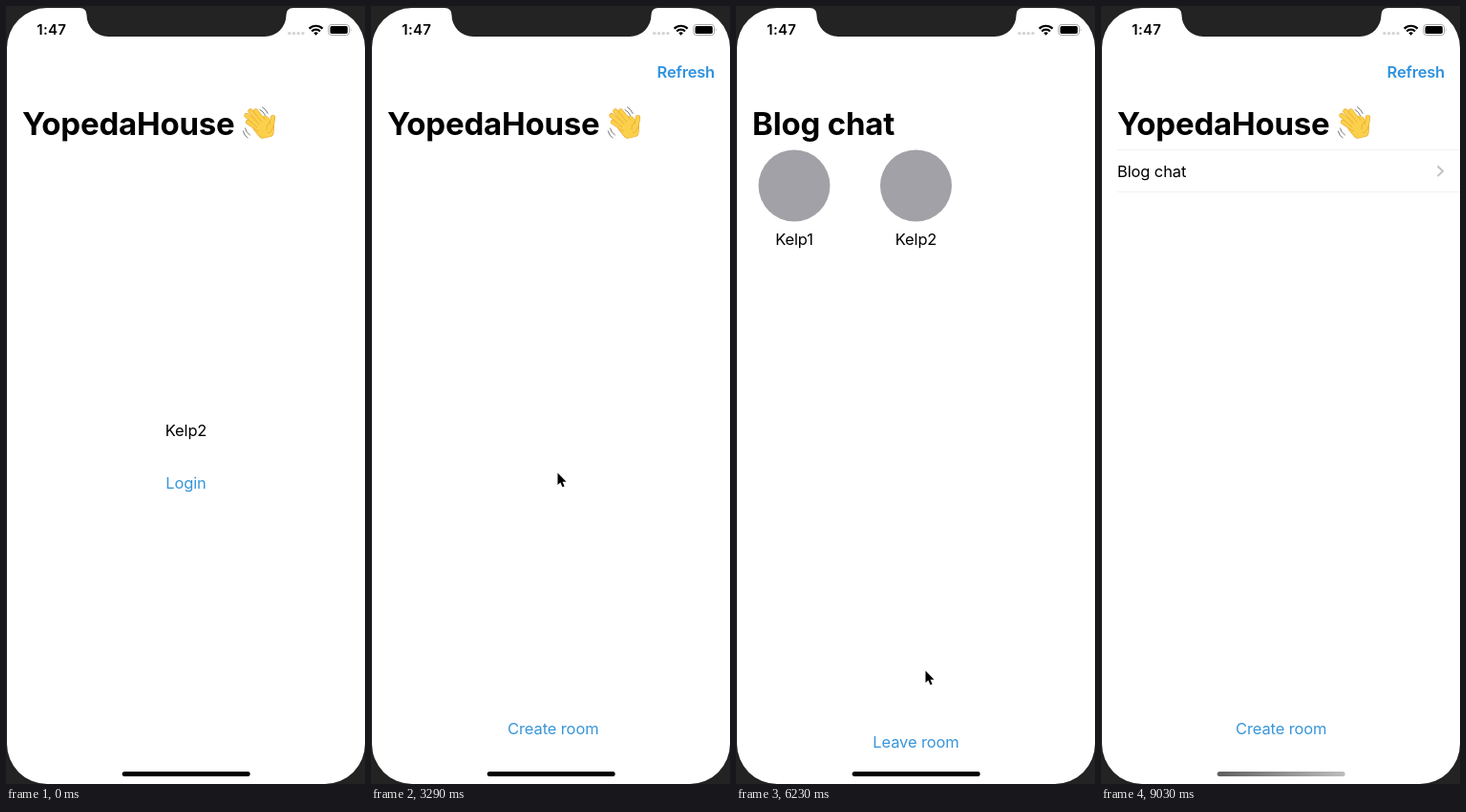
Write an HTML page that moves like this. It is 376 px wide and 814 px high and loops after 9100 ms.

```html
<!DOCTYPE html>
<html lang="en">
<head>
<meta charset="utf-8">
<title>Audio rooms demo</title>
<style>
  html, body { margin: 0; width: 100%; height: 100%; overflow: hidden; background: #232323; }
  svg { display: block; width: 100vw; height: 100vh; }
  text { font: 16.5px Inter, "Open Sans", sans-serif; letter-spacing: -.12px; }
  .mid { text-anchor: middle; }
  .link { fill: #3896d9; }
  .title { font-size: 33px; font-weight: 700; letter-spacing: -.2px; }
  .nav { font-size: 16.5px; font-weight: 600; letter-spacing: -.2px; text-anchor: end; fill: #2e92de; }
  .clock { font-size: 15px; font-weight: 600; letter-spacing: .3px; }
</style>
</head>
<body>
<svg viewBox="0 0 376 814" preserveAspectRatio="none">
  <defs>
    <g id="loader">
      <g class="spinner" transform="translate(188.5 435)" stroke="#8c8c90" stroke-width="2.5" stroke-linecap="round"></g>
      <text class="mid" x="188.5" y="481">Loading</text>
    </g>
    <linearGradient id="barFill"><stop id="barLeft" offset="0"/><stop id="barRight" offset="1"/></linearGradient>
  </defs>
  <rect width="376" height="814" fill="#fff"/>

  <g id="login">
    <g id="form">
      <text class="mid" x="188.5" y="450">Kelp2</text>
      <text class="mid link" id="loginBtn" x="188.5" y="505">Login</text>
    </g>
    <use id="loginWait" href="#loader"/>
  </g>

  <g id="rooms">
    <rect width="376" height="814" fill="#fff"/>
    <g id="list">
      <path d="M17 150.5H376M17 194.5H376" stroke="#f2f2f3"/>
      <rect id="cell" y="150.5" width="376" height="43.5" fill="#dddde2"/>
      <text x="17" y="178.5">Blog chat</text>
      <path d="M352.5 167.5l5.5 5.3l-5.5 5.3" fill="none" stroke="#c2c2c6" stroke-width="2"/>
    </g>
    <text class="mid link" x="188.7" y="762">Create room</text>
  </g>

  <g id="room">
    <rect width="376" height="814" fill="#fff"/>
    <text class="title" x="17" y="134.5">Blog chat</text>
    <use id="roomWait" href="#loader"/>
    <g id="people">
      <g fill="#a2a1a7"><circle cx="61" cy="188" r="37.5"/><circle cx="188.5" cy="188" r="37.5"/></g>
      <text class="mid" x="61" y="249.5">Kelp1</text>
      <text class="mid" x="188.5" y="249.5">Kelp2</text>
      <text class="mid link" id="leaveBtn" x="188.5" y="776">Leave room</text>
    </g>
  </g>

  <g id="home">
    <text class="title" x="17" y="134.5">YopedaHouse</text>
    <g id="wave" fill="none" stroke-linecap="round" stroke-linejoin="round">
      <path d="M266 108.5q4 2 5.500 6M268.500 105.800q4 2.400 5.600 6.500M250.500 128q1 4.500 5 7M248.300 131q1 4.500 4.800 7" stroke="#77777a"/>
    </g>
  </g>
  <text class="nav" id="refresh" x="360" y="74.5">Refresh</text>

  <text class="clock" x="32.3" y="30.3">1:47</text>
  <g fill="#d3d3d6">
    <circle cx="296.8" cy="28.6" r="1.7"/><circle cx="301.5" cy="28.6" r="1.7"/>
    <circle cx="306.2" cy="28.6" r="1.7"/><circle cx="310.9" cy="28.6" r="1.7"/>
  </g>
  <g fill="none" stroke="#000" stroke-width="2.2">
    <path d="M317.6 23.6a10 10 0 0 1 14 0M320.2 26.5a6.3 6.3 0 0 1 8.8 0"/>
    <path d="M322.3 28.3a3.4 3.4 0 0 1 4.6 0L324.6 30.8Z" fill="#000" stroke="none"/>
  </g>
  <rect x="337.8" y="19.5" width="21.7" height="11" rx="3" fill="none" stroke="#a6a6a8"/>
  <rect x="339.5" y="21.1" width="18.3" height="7.8" rx="1.6"/>
  <path d="M360.8 23.2q1.8 1.8 0 3.6z" fill="#a6a6a8"/>
  <rect x="121.7" y="800.9" width="134" height="5.1" rx="2.5" fill="url(#barFill)"/>

  <path id="arrow" d="M0 0V12.6L2.9 9.9L5 14.8L7.1 13.9L5 9.2H9Z" stroke="#fff" stroke-width="1.4" paint-order="stroke"/>

  <g fill="#232323">
    <path fill-rule="evenodd" d="M0 0H376V814H0ZM1 44V772A42 42 0 0 0 43 814H334A42 42 0 0 0 376 772V44A42 42 0 0 0 334 2H43A42 42 0 0 0 1 44Z"/>
    <path d="M77 0V2Q84.500 2 84.500 9.500A22.500 22.500 0 0 0 107 32H271A22.500 22.500 0 0 0 293.500 9.500Q293.500 2 301 2V0Z"/>
  </g>
</svg>
<script>
const LOOP = 9100, STEP = 70, W = 376;
const $ = id => document.getElementById(id);
const clamp = x => Math.max(0, Math.min(1, x));
const ramp = (t, a, b) => clamp((t - a) / (b - a));
const ease = x => x * x * (3 - 2 * x);
const within = (t, a, b) => t >= a && t < b;
const move = (id, x, y = 0) => $(id).setAttribute('transform', `translate(${x} ${y})`);
const fade = (id, a) => $(id).setAttribute('opacity', a);
const show = (id, on) => $(id).setAttribute('display', on ? 'inline' : 'none');
const gray = v => `rgb(${v},${v},${v})`;

// Critically damped settling used by screen pushes
function spring(t, start) {
  const u = Math.max(0, t - start) * 0.0146;
  return 1 - (1 + u) * Math.exp(-u);
}

function stroke(d, color, width) {
  const p = document.createElementNS('http://www.w3.org/2000/svg', 'path');
  p.setAttribute('d', d);
  p.setAttribute('stroke', color);
  p.setAttribute('stroke-width', width);
  return p;
}

// Waving hand: yellow parts, each with an amber edge
function handPart(d, width) {
  const top = stroke(d, '#fbd04b', width);
  top.setAttribute('fill', width > 6 ? '#fbd04b' : 'none');
  $('wave').append(stroke(d, '#e9aa35', width + 1.2), top);
}
handPart('M263 126L271 120L276 126L275.500 132L269 133.500Z', 9);
handPart('M275.500 130Q279 125 279.500 116.500', 4);
handPart('M264 128.500L253.500 121.500', 3.8);
handPart('M265.500 126L252 114.500', 4);
handPart('M268 123.500L256 110', 4);
handPart('M271 121.500L261.500 109.800', 3.8);
$('wave').append(stroke('M266 127L272 122.500L274 128L269 132Z', '#fbd04b', 6));
$('wave').append(stroke('M276 121.500Q272 124.500 273 129', '#e6a936', 0.8));

const spinner = document.querySelector('.spinner');
for (let i = 0; i < 8; i++) {
  const spoke = stroke('M0 -4.600V-8.700', '#8c8c90', 2.5);
  spoke.setAttribute('transform', `rotate(${i * 45})`);
  spinner.append(spoke);
}

// Pointer stops: time, x, y
const stops = [
  [70, 208, 818], [800, 195.5, 488.5], [3400, 195.5, 488.5], [3850, 328, 66],
  [4200, 328, 66], [4650, 311, 162.5], [5350, 311, 162.5], [5560, 304, 208],
  [6230, 198.5, 695.5], [6650, 195.5, 767.5], [8900, 195.5, 767.5], [9030, 200, 816]
];

function pointer(t) {
  const i = Math.max(1, stops.findIndex(s => s[0] >= t));
  const [a, b] = [stops[i - 1], stops[i]];
  const k = ease(ramp(t, a[0], b[0]));
  return [a[1] + (b[1] - a[1]) * k, a[2] + (b[2] - a[2]) * k];
}

function draw(t) {
  const toRooms = spring(t, 2790);
  const toRoom = t < 7930 ? spring(t, 4877) : 1 - spring(t, 7930);

  move('login', -0.3 * W * toRooms);
  show('form', t < 1190);
  fade('loginBtn', within(t, 1050, 1190) ? 0.25 : 1);
  show('loginWait', t >= 1190);

  move('rooms', W * (1 - toRooms) - 0.3 * W * toRoom);
  show('list', t >= 4130);
  fade('cell', t < 4760 ? 0 : t < 7930 ? 1 : toRoom);

  move('room', W * (1 - toRoom));
  show('roomWait', t < 5740);
  show('people', t >= 5740);
  fade('leaveBtn', 1 - 0.88 * ramp(t, 7700, 7840));

  move('home', 55 * toRoom);
  fade('home', clamp(1 - 1.5 * toRoom));
  fade('refresh', toRooms * clamp(1 - 1.5 * Math.max(0, toRoom - 0.05)) * (within(t, 3920, 4060) ? 0.3 : 1));

  // The first loader stalls shortly before its screen leaves
  const turn = Math.floor((t < 4800 ? Math.min(t, 2310) : t) / 125) + 2;
  [...spinner.children].forEach((spoke, i) => {
    const age = ((turn - i) % 8 + 8) % 8;
    spoke.setAttribute('opacity', Math.max(0.2, 0.72 - age * 0.11));
  });

  const dim = ramp(t, 8330, 8820);
  $('barLeft').setAttribute('stop-color', gray(Math.round(95 * dim)));
  $('barRight').setAttribute('stop-color', gray(Math.round(190 * dim)));

  const on = within(t, 70, 9030);
  show('arrow', on);
  if (on) move('arrow', ...pointer(t));
}

const begin = performance.now();
function tick() {
  const t = (performance.now() - begin) % LOOP;
  draw(Math.floor(t / STEP) * STEP);
  requestAnimationFrame(tick);
}
tick();
</script>
</body>
</html>
```
